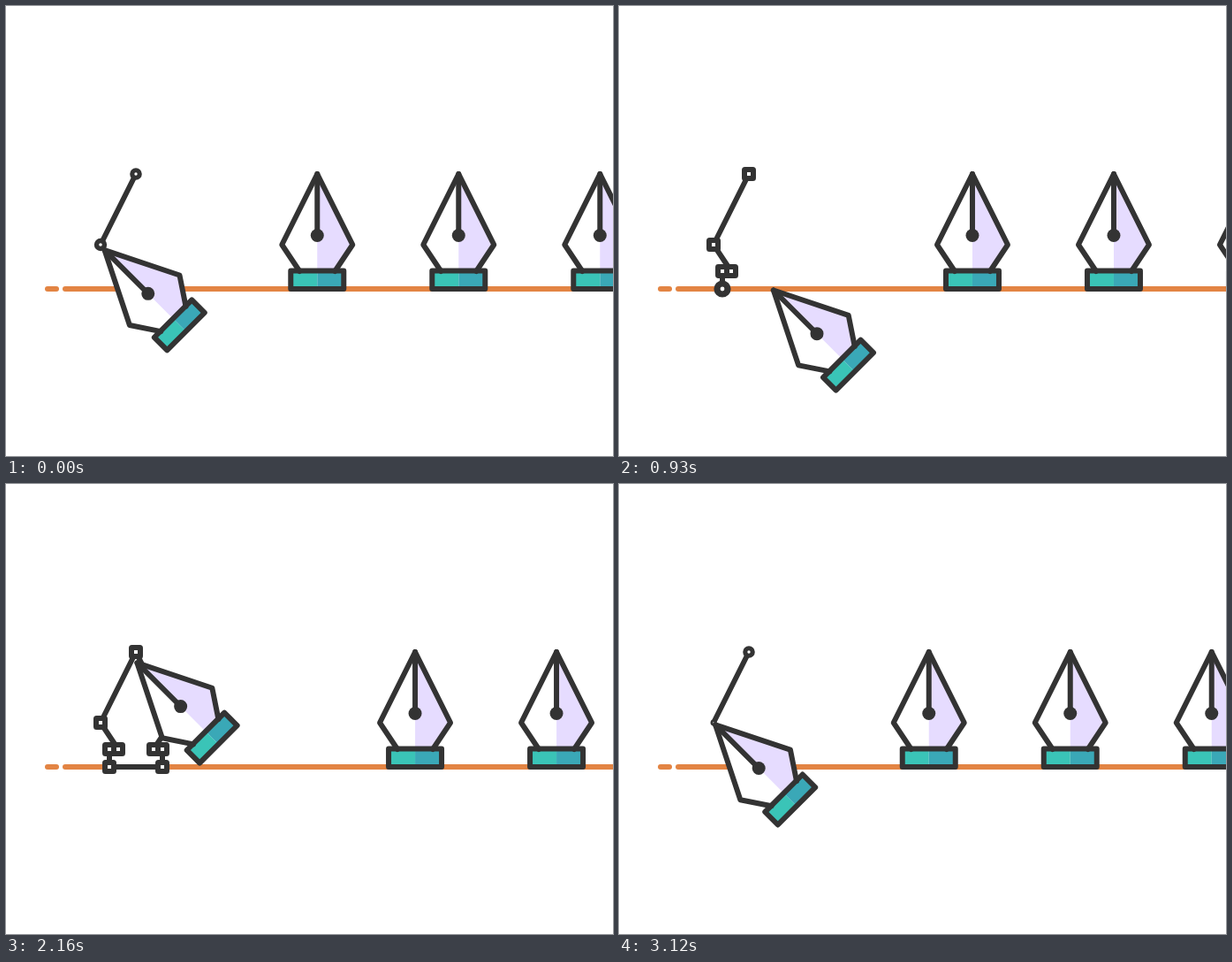
An HTML page with a canvas for the animation above (3.15 s loop, 687 by 509 pixels).

```html
<!DOCTYPE html>
<html lang="en">
<head>
<meta charset="utf-8">
<title>Pen line</title>
<style>
  html, body { margin: 0; width: 100%; height: 100%; overflow: hidden; background: #fff; }
  canvas { display: block; }
</style>
</head>
<body>
<canvas id="stage" width="687" height="509"></canvas>
<script>
const ctx = document.getElementById('stage').getContext('2d');
const LOOP = 3150, STEP = 30, JOINT = 2700;
const DARK = '#333333', GREY = '#8f8b88', ORANGE = '#e38443', TINT = '#ffa54c';
const LILAC = '#e6dcff', TEAL = '#3ac4b7', BLUE = '#3aa8b7';

// The pen leaves one anchor per BEAT and takes TRAVEL to reach the next.
const FIRST = 130, BEAT = 270, TRAVEL = 200;
const SPACING = 160, SLOT = 329.2, TOP = 190;
const MID = 147;
const left = [[-40, 80], [-20, 110], [-30, 110], [-30, 130]];
const right = left.map(([x, y]) => [-x, y]).reverse();
const anchors = [[0, 0], ...left, ...right].map(([x, y]) => [MID + x, TOP + y]);
const stemEnd = [MID, TOP + 70];
const route = [...anchors, anchors[0], stemEnd];
const beat = i => FIRST + BEAT * i;
const CLOSED = beat(anchors.length), STEM_DONE = CLOSED + TRAVEL;

const clamp = v => Math.max(0, Math.min(1, v));
const part = (t, a, b) => clamp((t - a) / (b - a));
const smooth = p => p * p * (3 - 2 * p);
const ease = (t, a, b) => smooth(part(t, a, b));
const mix = (a, b, p) => a + (b - a) * p;
const between = (a, b, p) => [mix(a[0], b[0], p), mix(a[1], b[1], p)];

function penPose(t) {
  const swing = ease(t, STEM_DONE + 30, LOOP);
  const lean = ease(t, 0, 300) * (1 - swing);
  const leg = Math.max(0, Math.min(route.length - 2, Math.floor((t - FIRST) / BEAT)));
  const tip = between(route[leg], route[leg + 1], ease(t, beat(leg), beat(leg) + TRAVEL));
  const [x, y] = between(tip, [SLOT, TOP], swing);
  return [x + 1.5 * lean, y + 1.5 * lean - 5 * Math.sin(Math.PI * swing), -45 * lean];
}

function trace(points, close) {
  ctx.beginPath();
  points.forEach(([x, y]) => ctx.lineTo(x, y));
  if (close) ctx.closePath();
}

function stroke(color, width) {
  ctx.strokeStyle = color;
  ctx.lineWidth = width;
  ctx.stroke();
}

function fill(color) {
  ctx.fillStyle = color;
  ctx.fill();
}

function drawPen(x, y, angle = 0) {
  ctx.save();
  ctx.translate(x, y);
  ctx.rotate(angle * Math.PI / 180);
  for (const [side, nib, cap] of [[-1, '#fff', TEAL], [1, LILAC, BLUE]]) {
    trace([[0, 0], [0, 110], [20 * side, 110], [40 * side, 80]], true);
    fill(nib);
    ctx.fillStyle = cap;
    ctx.fillRect(0, 109.5, 30 * side, 20.5);
  }
  trace([[-20, 110], [-40, 80], [0, 0], [40, 80], [20, 110]]);
  stroke(DARK, 6);
  trace([[0, 0], [0, 70]]);
  stroke(DARK, 6);
  ctx.beginPath();
  ctx.arc(0, 69.5, 7.5, 0, 7);
  fill(DARK);
  ctx.beginPath();
  ctx.rect(-30, 109.5, 60, 20.5);
  stroke(DARK, 6);
  ctx.restore();
}

// Pops up as a ring, shrinks a little, then settles as a square.
function drawNode([x, y], age, scale, round) {
  if (age <= 0) return;
  const rise = 1.2 * (1 - (1 - part(age, 0, 100)) ** 2);
  const k = scale * (rise - .35 * ease(age, 230, 290) + .15 * ease(age, 350, 450));
  if (k <= 0) return;
  const corner = round ? 5 : mix(5, .5, part(age, 330, 370));
  ctx.beginPath();
  ctx.roundRect(x - 5 * k, y - 5 * k, 10 * k, 10 * k, corner * k);
  fill('#fff');
  stroke(DARK, 6 * k);
}

function drawSketch(t) {
  const tint = part(t, 2790, 2920);
  const fade = part(t, 2850, 3090);
  const stem = [anchors[0], stemEnd];
  const stemAge = t - STEM_DONE;
  if (tint) {
    ctx.globalAlpha = tint;
    trace(anchors, true);
    fill(TINT);
    ctx.globalAlpha = 1;
  }
  for (let i = 0; i < route.length - 1; i++) {
    const end = Math.min(beat(i + 1), STEM_DONE);
    const p = part(t, end - 40, end);
    if (!p) continue;
    trace([route[i], between(route[i], route[i + 1], p)]);
    stroke(DARK, 6);
  }
  if (fade) {
    ctx.globalAlpha = Math.sin(Math.PI * fade);
    trace(anchors, true);
    stroke(GREY, 3);
    trace(stem);
    stroke(GREY, 4);
    ctx.globalAlpha = 1 - fade;
    drawNode(stemEnd, stemAge, 1, true);
    ctx.globalAlpha = fade;
    drawPen(MID, TOP);
    ctx.globalAlpha = 1;
  }
  anchors.forEach((a, i) => drawNode(a, t - beat(i), 1 - fade, false));
  drawNode(stemEnd, stemAge, 1 - fade, true);
}

function drawBelt(t) {
  for (const [a, b] of [[47, 57], [67, 700]]) {
    trace([[a, 320], [b, 320]]);
    stroke(ORANGE, 6);
  }
  const x = SLOT + SPACING * part(t, 0, LOOP - STEP);
  for (let i = 0; i < 3; i++) drawPen(x + SPACING * i, TOP);
}

function draw(time) {
  const t = (Math.floor(time / STEP) * STEP - JOINT + LOOP) % LOOP;
  ctx.fillStyle = '#fff';
  ctx.fillRect(0, 0, 687, 509);
  ctx.lineCap = ctx.lineJoin = 'round';
  drawBelt(t);
  drawSketch(t);
  drawPen(...penPose(t));
}

const begin = performance.now();
function tick() {
  draw((performance.now() - begin) % LOOP);
  requestAnimationFrame(tick);
}
tick();
</script>
</body>
</html>
```
